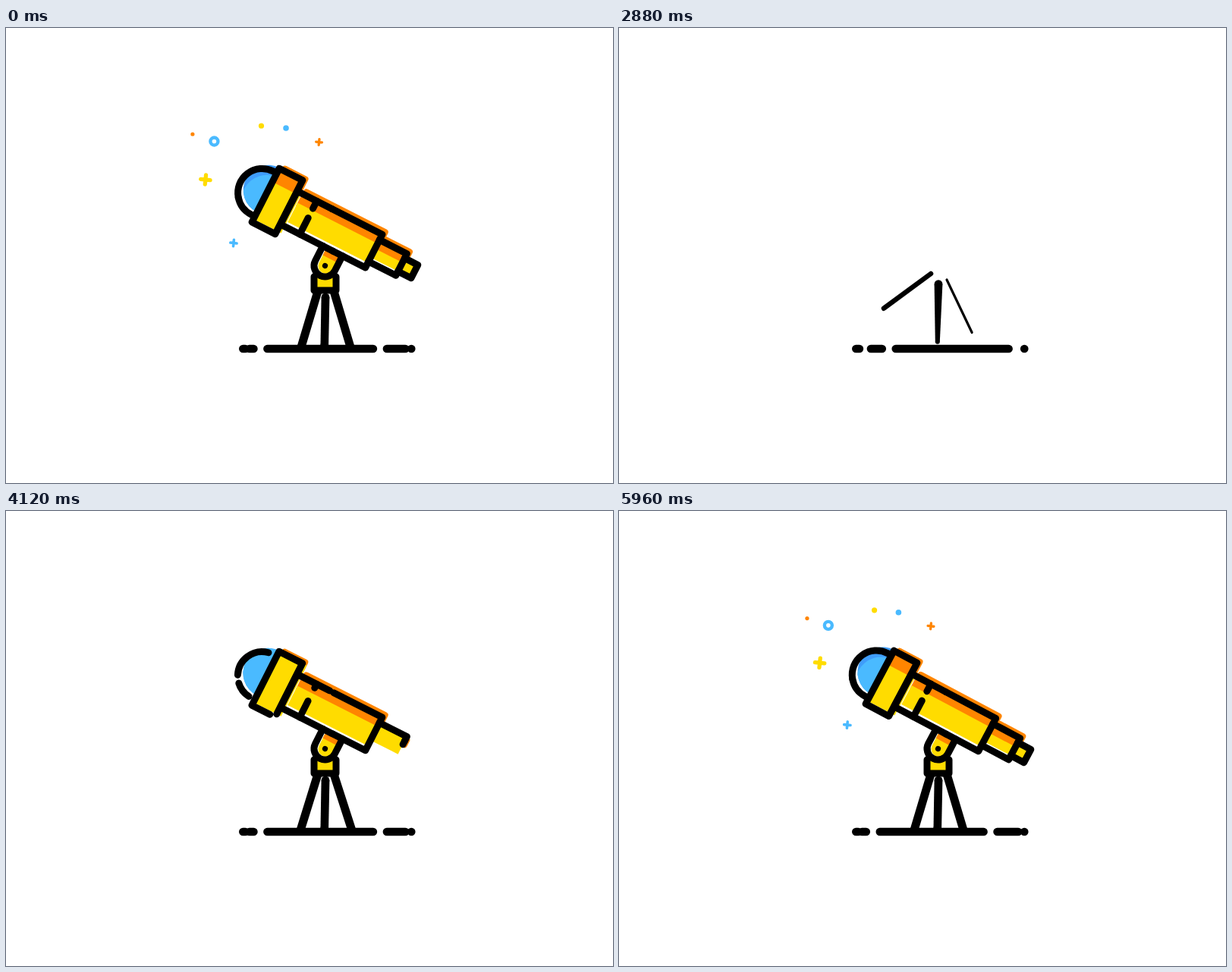
An HTML page that plays this animation: 800x600 px, repeating every 6 s.

```html
<!DOCTYPE html>
<html>
<head>
<meta charset="utf-8">
<style>
html, body { margin: 0; width: 100%; height: 100%; overflow: hidden; background: #fff; }
svg { display: block; width: 800px; height: 600px; }
</style>
</head>
<body>
<svg viewBox="0 0 800 600">
  <defs><clipPath id="dome"><path d="M-108-88h-4a33 33 0 0 0 0 66h4z"/></clipPath></defs>
  <g id="stage"></g>
</svg>
<script>
const LOOP = 6000, CUT = 1200, LAP = 1880, RELEASE = 3480, AIM = 5200;
const YELLOW = '#ffdc00', ORANGE = '#ff8500', BLUE = '#4abaff', DEEP = '#3f9dfa';
const stage = document.getElementById('stage');

function ease(t, from, to) {
  const s = Math.min(1, Math.max(0, (t - from) / (to - from)));
  return s * s * (3 - 2 * s);
}
const turn = (s, period) => 2 * Math.PI * s / period;

// The spring that swings legs and tube into place: 1 before release, then a damped wave
function swing(t) {
  const s = Math.max(0, t - RELEASE);
  return Math.exp(-s / 180) * Math.cos(turn(s, 560));
}

// The later nod of the tube, in degrees
function nod(t) {
  const s = Math.max(0, t - AIM);
  return 15 * Math.exp(-s / 500) * Math.sin(turn(s, 760));
}

const rect = (x1, y1, x2, y2, fill, r = 0) =>
  `<rect x="${x1}" y="${y1}" width="${x2 - x1}" height="${y2 - y1}" rx="${r}" fill="${fill}"/>`;
const shape = (d, fill) => `<path d="${d}" fill="${fill}"/>`;
const dot = (x, y, r, fill) => `<circle cx="${x}" cy="${y}" r="${r}" fill="${fill}"/>`;
const stroke = (d, w = 9, color = '#000', extra = '') =>
  `<path d="${d}" fill="none" stroke="${color}" stroke-width="${w}" stroke-linecap="round" stroke-linejoin="round" ${extra}/>`;
const grow = (x, y, k, body) => k <= 0 ? '' :
  `<g transform="translate(${x} ${y}) scale(${k}) translate(${-x} ${-y})">${body}</g>`;

// Only the part of a path from a to b, both 0..1
function trim(d, b, a = 0) {
  if (b <= a) return '';
  if (a <= 0 && b >= 1) return stroke(d);
  const from = Math.max(0, a);
  return stroke(d, 9, '#000', `pathLength="1" stroke-dasharray="${b - from} 2" stroke-dashoffset="${-from}"`);
}

// Gaps glide along the ground line, fast in the middle and slow at both ends
function ground(t) {
  const phase = t < CUT ? 360 + 0.9 * t : t % LAP, end = 534.3;
  let out = '', from = 312.3;
  const dash = to => { if (to > from) out += stroke(`M${from} 423H${to}`, 10.6); };
  for (let u = phase; u < 4 * LAP; u += LAP) {
    const x = (u - 3600) / 760;
    const left = 422 + 109.5 * x / Math.hypot(1, x);
    dash(left);
    from = Math.min(end - 0.1, left + 18 * Math.min(1, u / 1200));
  }
  dash(end);
  return out;
}

// The centre pole hops out of the ground, dips on landing and settles
function pole(t) {
  const s = t - 1640, air = 680;
  if (s < 0) return '';
  const lift = s < air ? 150 * Math.sin(Math.PI * s / air)
    : -40 * Math.exp(-(s - air) / 120) * Math.sin(turn(s - air, 320));
  const set = ease(t, 3000, 3300);
  const foot = 414 + 4 * set - lift;
  const top = foot - (76 - 13 * set) * ease(s, 0, 260);
  const r = 5.4, f = 3 + 2.3 * set;
  return dot(421, top, r, '#000') + dot(419.8, foot, f, '#000') +
    shape(`M${421 - r} ${top}H${421 + r}L${419.8 + f} ${foot}H${419.8 - f}Z`, '#000');
}

function leg(x, y, deg, w) {
  const a = deg * Math.PI / 180;
  return w <= 0 ? '' : stroke(`M${x} ${y}l${77 * Math.sin(a)} ${77 * Math.cos(a)}`, w);
}

function legs(t) {
  const raised = 1 - ease(t, 3000, 3300), rest = 16.6;
  return leg(411, 347 - 23 * raised, -rest - 37 * swing(t), 11 * ease(t, 2600, 3100)) +
    leg(432, 347 - 6 * swing(t) - 9 * raised, rest + 72 * swing(t) * ease(t, 2780, 3240),
      11 * ease(t, 2760, 3100));
}

function base(t) {
  return grow(421, 336, ease(t, 3160, 3360), rect(407, 326, 432, 346, YELLOW)) +
    trim('M435 328V346H406V328', ease(t, 3240, 3720));
}

function lens(t) {
  const shade = ease(t, 4120, 4320), gap = 0.1 * (1 - ease(t, 4120, 4240));
  const fill = grow(-112, -55, ease(t, 3760, 4000),
    `<g clip-path="url(#dome)">${rect(-150, -95, -105, -15, DEEP)}` +
    dot(-112 + 4.6 * shade, -55 + 13 * shade, 33.5, BLUE) + '</g>');
  const line = trim('M-142.7-28.3A32 32 0 0 1-117.5-80H-112', ease(t, 3700, 4260), gap) +
    trim('M-142.7-28.3A32 32 0 0 0-117.5-16H-112', ease(t, 3760, 4300), gap);
  const slide = 8 * Math.sin(Math.PI * ease(t, AIM, AIM + 560));
  return `<g transform="translate(${slide} 0)">${fill}${line}</g>`;
}

function scope(t) {
  const angle = 28 - 65 * swing(t) - nod(t);
  const shade = ease(t, 4120, 4320), eye = shade;
  const body = ease(t, 3180, 4200), bodyStart = 0.13 * swing(t) * ease(t, 3160, 3400);

  const fills =
    grow(0, 0, ease(t, 3160, 3360),
      shape('M-9-22V0A10 10 0 0 0 11 0V-22Z', YELLOW) + rect(-9, -22, 11, -11, ORANGE)) +
    grow(-6, -50, ease(t, 3600, 3840),
      rect(-70, -79.5, 54.5, -50, ORANGE, 4) + rect(-70, -57.5, 51, -29, YELLOW)) +
    grow(52, -50, ease(t, 3920, 4080),
      rect(52, -63 - 8 * shade, 95, -48, shade ? ORANGE : YELLOW, 4) +
      rect(52, -63 + 13 * shade, 89, -37, YELLOW)) +
    grow(98, -47, eye, rect(93, -54, 106, -40, YELLOW)) +
    grow(-92, -50, ease(t, 3640, 3880),
      rect(-109, -94, -71, -60, ORANGE, 4) + rect(-109, -87 + 20 * shade, -71, -12, YELLOW));

  const lines =
    trim('M14.5-22V0A14.5 14.5 0 0 1-14.5 0V-22', ease(t, 3200, 3560)) +
    dot(0, 0, 3.6, '#000') +
    trim('M0-22H-77V-71H-26', body, bodyStart) +
    trim('M0-22H48.5V-71H-26', body, bodyStart) +
    trim('M48.5-63H89V-31H48.5', ease(t, 3960, 4300)) +
    trim('M89-56.5H108.5V-37H89', eye) +
    trim('M-77.5-12V-87H-112V-7.5H-77.5Z', ease(t, 3640, 4200)) +
    trim('M-48.5-22V-46', ease(t, 3900, 4080)) +
    trim('M-48.5-71V-60', ease(t, 4040, 4200));

  return `<g transform="translate(420.5 313.5) rotate(${angle})">${lens(t)}${fills}${lines}</g>`;
}

const SPARKS = [
  ['dot', 246, 140, 2.6, ORANGE],
  ['ring', 274.5, 149.5, 5, BLUE],
  ['dot', 336.5, 129, 3.6, YELLOW],
  ['dot', 369, 132, 3.8, BLUE],
  ['plus', 412.5, 150.5, 3.9, ORANGE],
  ['plus', 263, 200, 6.2, YELLOW],
  ['plus', 300, 283.5, 4.2, BLUE]
];

// Sparks burst from the lens, drift on sideways and shrink away
function sparks(t) {
  const s = t - LOOP, rise = 440, fall = 560;
  if (s < -rise || s >= fall) return '';
  const out = s < 0 ? 1 - Math.pow(-s / rise, 1.6) : 1;
  const drift = s > 0 ? 1 - Math.pow(1 - s / fall, 2) : 0;
  const size = ease(s, -rise, -160) * (1 - ease(s, 160, fall));
  return SPARKS.map(([kind, px, py, r, color]) => {
    const x = 340 + (px - 340) * (out + 0.3 * drift), y = 215 + (py - 215) * (out + 0.08 * drift);
    const body = kind === 'dot' ? dot(0, 0, r, color)
      : kind === 'ring' ? `<circle r="${r}" fill="none" stroke="${color}" stroke-width="4.4"/>`
      : stroke(`M${-r} 0H${r}M0 ${-r}V${r}`, r * 0.85, color, 'transform="rotate(6)"');
    return `<g transform="translate(${x} ${y}) scale(${size})">${body}</g>`;
  }).join('');
}

function draw(now) {
  const t = now % LOOP;
  const T = t < CUT ? t + LOOP : t; // the finished scene runs on past the loop point
  stage.innerHTML = ground(t) + pole(T) + legs(T) +
    sparks(T) + (T > 3160 ? base(T) + scope(T) : '');
}

const start = performance.now();
function frame() {
  draw(performance.now() - start);
  requestAnimationFrame(frame);
}
frame();
</script>
</body>
</html>
```
